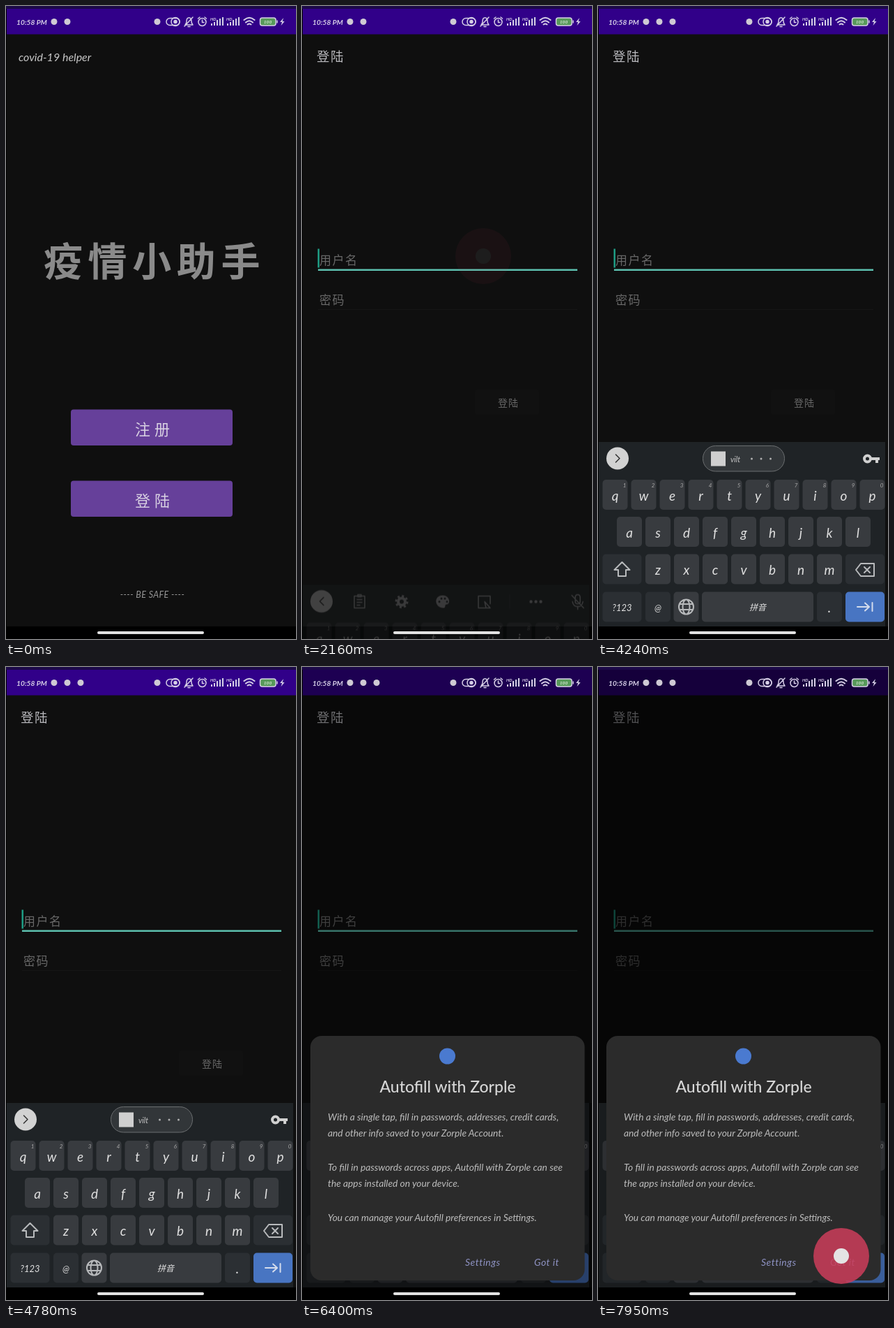
An HTML page that plays this animation: 416x906 px, repeating every 8 s.

```html
<!DOCTYPE html>
<html lang="zh">
<head>
<meta charset="utf-8">
<title>covid-19 helper</title>
<style>
html, body { margin: 0; width: 100%; height: 100%; overflow: hidden; background: #000; }
svg { display: block; width: 100%; height: 100%; }
text { font-family: Lato, "Noto Sans CJK SC", "Noto Sans CJK", sans-serif; font-style: italic; dominant-baseline: central; }
.cjk { font-family: "Noto Sans CJK SC", "Noto Sans CJK", sans-serif; font-weight: 500; font-style: normal; }
.mid { text-anchor: middle; }
.line { fill: none; stroke-width: 1.5; stroke-linecap: round; stroke-linejoin: round; }

.a { animation: 8s linear infinite both; }
.home { animation-name: home; }
.login { animation-name: login; }
.focus { animation-name: focus; }
.third { animation-name: third; }
.board { animation-name: board; }
.tools { animation-name: tools; }
.chip { animation-name: chip; }
.dim { animation-name: dim; }
.boardDim { animation-name: boardDim; }
.upper { animation-name: upper; }
.lower { animation-name: lower; }
.tap1 { animation-name: tap1; }
.tap2 { animation-name: tap2; }
.tap3 { animation-name: tap3; }
.tap4 { animation-name: tap4; }

@keyframes home {
  0%, 17.5% { transform: translateX(0); opacity: 1; animation-timing-function: ease-out; }
  21.5% { transform: translateX(-110px); opacity: 1; }
  21.6%, 100% { transform: translateX(-110px); opacity: 0; }
}
@keyframes login {
  0%, 17.5% { transform: translateX(416px); animation-timing-function: ease-out; }
  21.5%, 100% { transform: translateX(0); }
}
@keyframes focus { 0%, 24% { opacity: 0; } 25%, 100% { opacity: 1; } }
@keyframes third { 0%, 31% { opacity: 0; } 31.5%, 100% { opacity: 1; } }
@keyframes board {
  0%, 25.8% { transform: translateY(282px); opacity: 0; }
  27% { transform: translateY(206px); opacity: .25; animation-timing-function: ease-out; }
  30%, 100% { transform: translateY(0); opacity: 1; }
}
@keyframes tools { 0%, 32% { opacity: 1; } 33%, 100% { opacity: 0; } }
@keyframes chip { 0%, 32% { opacity: 0; } 33%, 100% { opacity: 1; } }
@keyframes dim {
  0%, 61% { opacity: 0; }
  64%, 95.6% { opacity: .4; }
  97.5%, 100% { opacity: .57; }
}
@keyframes boardDim {
  0%, 61% { opacity: 0; }
  64%, 95.6% { opacity: .45; }
  97.5%, 100% { opacity: .2; }
}
@keyframes upper {
  0%, 61.6% { opacity: 0; filter: brightness(1); }
  64.5%, 69.5% { opacity: 1; filter: brightness(1); }
  71.3% { opacity: 1; filter: brightness(.66); }
  74.3%, 100% { opacity: 0; filter: brightness(.4); }
}
@keyframes lower { 0%, 69.5% { opacity: 0; } 71.2%, 100% { opacity: 1; } }
@keyframes tap1 { 0%, 13.4% { opacity: 0; } 14.2%, 16.2% { opacity: 1; } 20%, 100% { opacity: 0; } }
@keyframes tap2 { 0%, 22.6% { opacity: 0; } 23.4%, 24.6% { opacity: 1; } 27% { opacity: .07; } 27.6%, 100% { opacity: 0; } }
@keyframes tap3 { 0%, 37.4% { opacity: 0; } 38.4%, 40.6% { opacity: 1; } 44.6%, 100% { opacity: 0; } }
@keyframes tap4 { 0%, 96.4% { opacity: 0; } 97.4%, 100% { opacity: 1; } }
</style>
</head>
<body>
<svg viewBox="0 0 416 906" preserveAspectRatio="none">
  <defs>
    <g id="tap">
      <circle r="40" fill="#c83d59" opacity=".88"/>
      <circle r="11" fill="#e4e4e4"/>
    </g>
    <g id="signal" fill="#d6cfe6">
      <text x="0" y="18" font-size="6" font-weight="700">HD</text>
      <path d="M1 28v-3h2v3zM5 28v-5h2v5zM9 28v-8h2v8zM13 28v-10h2v10zM17 28v-12h2v12z"/>
    </g>
    <g id="dialog">
      <rect x="12" y="528" width="393.500" height="350" rx="16" fill="#2b2b2b"/>
      <circle cx="208.500" cy="557" r="11.500" fill="#4a7ad0"/>
      <text class="mid" x="209" y="600" font-size="23" font-weight="500" fill="#d6d6d6" style="font-style:normal">Autofill with Zorple</text>
      <g font-size="13.800" fill="#bcbcbc">
        <text x="37" y="643.500">With a single tap, fill in passwords, addresses, credit cards,</text>
        <text x="37" y="666.500">and other info saved to your Zorple Account.</text>
        <text x="37" y="715.500">To fill in passwords across apps, Autofill with Zorple can see</text>
        <text x="37" y="738.500">the apps installed on your device.</text>
        <text x="37" y="787">You can manage your Autofill preferences in Settings.</text>
      </g>
      <g font-size="14" letter-spacing=".5" fill="#8f93c4">
        <text x="234" y="851">Settings</text>
        <text x="333" y="851">Got it</text>
      </g>
    </g>
  </defs>

  <rect width="416" height="906" fill="#000"/>
  <rect x="1" y="40" width="415" height="848" fill="#0f0f0f"/>

  <g class="a home">
    <text x="18" y="72" font-size="16" fill="#c6c6c6">covid-19 helper</text>
    <text class="cjk" x="54" y="361" font-size="56" letter-spacing="7.600" fill="#8a8a8a" style="font-weight:700">疫情小助手</text>
    <g fill="#66409a">
      <rect x="93" y="577.500" width="232" height="51.500" rx="4"/>
      <rect x="93" y="679.500" width="232" height="51.500" rx="4"/>
    </g>
    <g font-size="22" letter-spacing="6" fill="#d8d0e2">
      <text class="cjk" x="185" y="604">注册</text>
      <text class="cjk" x="185" y="706">登陆</text>
    </g>
    <text class="mid" x="210" y="842" font-size="12.500" letter-spacing=".4" fill="#959595">---- BE SAFE ----</text>
  </g>

  <g class="a login">
    <rect x="1" y="40" width="415" height="848" fill="#0f0f0f"/>
    <text class="cjk" x="21" y="71" font-size="18.500" letter-spacing="1.500" fill="#b8b8bc">登陆</text>
    <g font-size="17" letter-spacing="1.500" fill="#686868">
      <text class="cjk" x="25" y="362">用户名</text>
      <text class="cjk" x="25" y="419">密码</text>
    </g>
    <path d="M23 434.500H395" stroke="#161616"/>
    <rect x="248" y="549" width="92" height="36" rx="3" fill="#111"/>
    <text class="cjk" x="281" y="567" font-size="14" letter-spacing="1" fill="#686868">登陆</text>
    <g class="a focus">
      <rect x="23" y="376.500" width="372" height="2.500" fill="#5cbfae"/>
      <rect x="22.500" y="347.500" width="2.500" height="27" fill="#1e9c84"/>
    </g>
  </g>

  <rect width="416" height="4" fill="#1c0a48"/>
  <rect x="1" y="4" width="415" height="36.500" fill="#310089"/>
  <rect class="a dim" y="4" width="416" height="884" fill="#000"/>

  <g>
    <text x="15" y="22.500" font-size="10.300" font-weight="700" fill="#d6cfe6">10:58 PM</text>
    <g fill="#cfcad4">
      <circle cx="69" cy="22.500" r="4.500"/>
      <circle cx="88" cy="22.500" r="4.500"/>
      <circle class="a third" cx="107" cy="22.500" r="4.500"/>
      <circle cx="217" cy="22.500" r="4.500"/>
    </g>
    <g class="line" stroke="#d6cfe6">
      <rect x="230" y="17.500" width="19" height="10" rx="5"/>
      <circle cx="243" cy="22.500" r="6"/>
      <circle cx="243" cy="22.500" r="2" fill="#d6cfe6"/>
      <path d="M257 27h11c-2-2-2-3-2-5 0-7-7-7-7 0 0 2 0 3-2 5M261 29.500h3M256 29l12-13"/>
      <circle cx="281.500" cy="23" r="5.500"/>
      <path d="M281.500 20v3.500h2.500M275.500 18l2.500-2M287.500 18l-2.500-2"/>
      <path d="M341.500 20q7.500-6.500 15 0M344 23.500q5-4.500 10 0M346.500 26.500q2.500-2 5 0" stroke-width="2"/>
      <rect x="364.500" y="17" width="22.500" height="11" rx="3" fill="#579a59"/>
      <path d="M389 21v3"/>
    </g>
    <text class="mid" x="375.500" y="22.500" font-size="6.500" fill="#fff">100</text>
    <path d="M398 17l-5 6h3l-1.500 5 5-6h-3z" fill="#d6cfe6"/>
    <use href="#signal" x="293"/>
    <use href="#signal" x="316"/>
  </g>

  <g class="a board">
    <rect x="1" y="624" width="411" height="264" fill="#1f2326"/>
    <circle cx="28" cy="647.500" r="16" fill="#d2d2d2"/>
    <g class="a tools">
      <path class="line" d="M31 642l-5.500 5.500 5.500 5.500" stroke="#333" stroke-width="2"/>
      <g class="line" stroke="#b4b6b8" stroke-width="2">
        <path d="M75 640h15v17h-15zM80 638h5v3h-5zM79 645h7M79 649h7M79 653h4"/>
        <circle cx="143" cy="648" r="5" stroke-width="4"/>
        <circle cx="143" cy="648" r="8" stroke-width="3" stroke-dasharray="3 3.280" stroke-linecap="butt"/>
        <path d="M264 657h-11v-17h17v11M262 648l8 9h-6z"/>
        <path d="M298 638v20" stroke="#34383b" stroke-width="1"/>
        <path d="M392 642q0-4 3.500-4t3.500 4v6q0 3-3.500 3t-3.500-3zM388 648q1 7 7.500 7t7.500-7M395.500 655v4M387 639l17 18"/>
      </g>
      <path d="M202 639c-14 0-12 18 1 18 4 0 1-5 4-5 7 0 5-13-5-13z" fill="#b4b6b8"/>
      <g fill="#1f2326"><circle cx="197" cy="648" r="1.500"/><circle cx="200" cy="643.500" r="1.500"/><circle cx="205" cy="643.500" r="1.500"/><circle cx="208" cy="648" r="1.500"/></g>
      <g fill="#b4b6b8"><circle cx="328.500" cy="648" r="2.200"/><circle cx="335.500" cy="648" r="2.200"/><circle cx="342.500" cy="648" r="2.200"/></g>
    </g>
    <g class="a chip">
      <path class="line" d="M25.500 642l5.500 5.500-5.500 5.500" stroke="#333" stroke-width="2"/>
      <rect x="150.500" y="629.500" width="117" height="36.500" rx="18" fill="#323639" stroke="#6b6e70"/>
      <rect x="162" y="637.500" width="21" height="21" fill="#cfcfcf"/>
      <text x="190" y="648" font-size="11" fill="#c4c4c4">vilt</text>
      <g fill="#b0b0b0"><circle cx="220.500" cy="648" r="1.500"/><circle cx="234" cy="648" r="1.500"/><circle cx="247.500" cy="648" r="1.500"/></g>
      <circle cx="386.500" cy="648" r="4.500" fill="none" stroke="#d0d0d0" stroke-width="4"/>
      <path d="M391 646h13v4h-2v4h-4v-4h-7z" fill="#d0d0d0"/>
    </g>
    <g id="keys"></g>
  </g>
  <rect class="a boardDim" y="624" width="416" height="264" fill="#000"/>

  <g class="a upper"><use href="#dialog" y="-264"/></g>
  <g class="a lower"><use href="#dialog"/></g>
  <rect x="131" y="895" width="153" height="4" rx="2" fill="#e2e2e2"/>

  <g class="a tap1"><use href="#tap" x="250" y="706"/></g>
  <g class="a tap2"><use href="#tap" x="260" y="358"/></g>
  <g class="a tap3"><use href="#tap" x="190" y="657"/></g>
  <g class="a tap4"><use href="#tap" x="349" y="843"/></g>
</svg>
<script>
const PLAIN = '#383b3f', DARK = '#2b2f33';

const key = (cx, y, label = '', w = 36, fill = PLAIN, size = 19) =>
  `<rect x="${cx - w / 2}" y="${y}" width="${w}" height="43" rx="5" fill="${fill}"/>
   <text class="mid" x="${cx}" y="${y + 22}" font-size="${size}" fill="#e0e0e0">${label}</text>`;

const row = (letters, x, y) =>
  [...letters].map((c, i) => key(x + i * 41, y, c)).join('');

const hints = [...'1234567890'].map((n, i) =>
  `<text class="mid" x="${38 + i * 41}" y="686" font-size="8" fill="#a8a8a8">${n}</text>`).join('');

const icon = (d, color = '#b8babc') =>
  `<path class="line" d="${d}" stroke="${color}" style="stroke-width:2"/>`;

document.getElementById('keys').innerHTML =
  row('qwertyuiop', 24.5, 678) + hints +
  row('asdfghjkl', 45, 731) +
  key(34.5, 784.5, '', 56, DARK) + row('zxcvbnm', 86, 784.5) + key(383, 784.5, '', 56, DARK) +
  key(34.5, 838.5, '?123', 56, DARK, 13) + key(86, 838.5, '@', 36, DARK, 13) +
  key(126.5, 838.5) + key(229, 838.5, '拼音', 160, PLAIN, 12) +
  key(332, 838.5, '.', 36, DARK) + key(383, 838.5, '', 56, '#4875c2') +
  icon('M34.500 796l11 11h-5.500v9h-11v-9h-5.500z') +
  icon('M370 807l7-9h19v18h-19zM382 803l8 8M390 803l-8 8') +
  icon('M372 860h16M383 854.500l6 5.500-6 5.500M393.500 854v12', '#d4dcec') +
  icon('M116 860a10.500 10.500 0 1 0 21 0a10.500 10.500 0 1 0-21 0M121.500 860a5 10.500 0 1 0 10 0a5 10.500 0 1 0-10 0M117 856h19M117 864h19');
</script>
</body>
</html>
```
